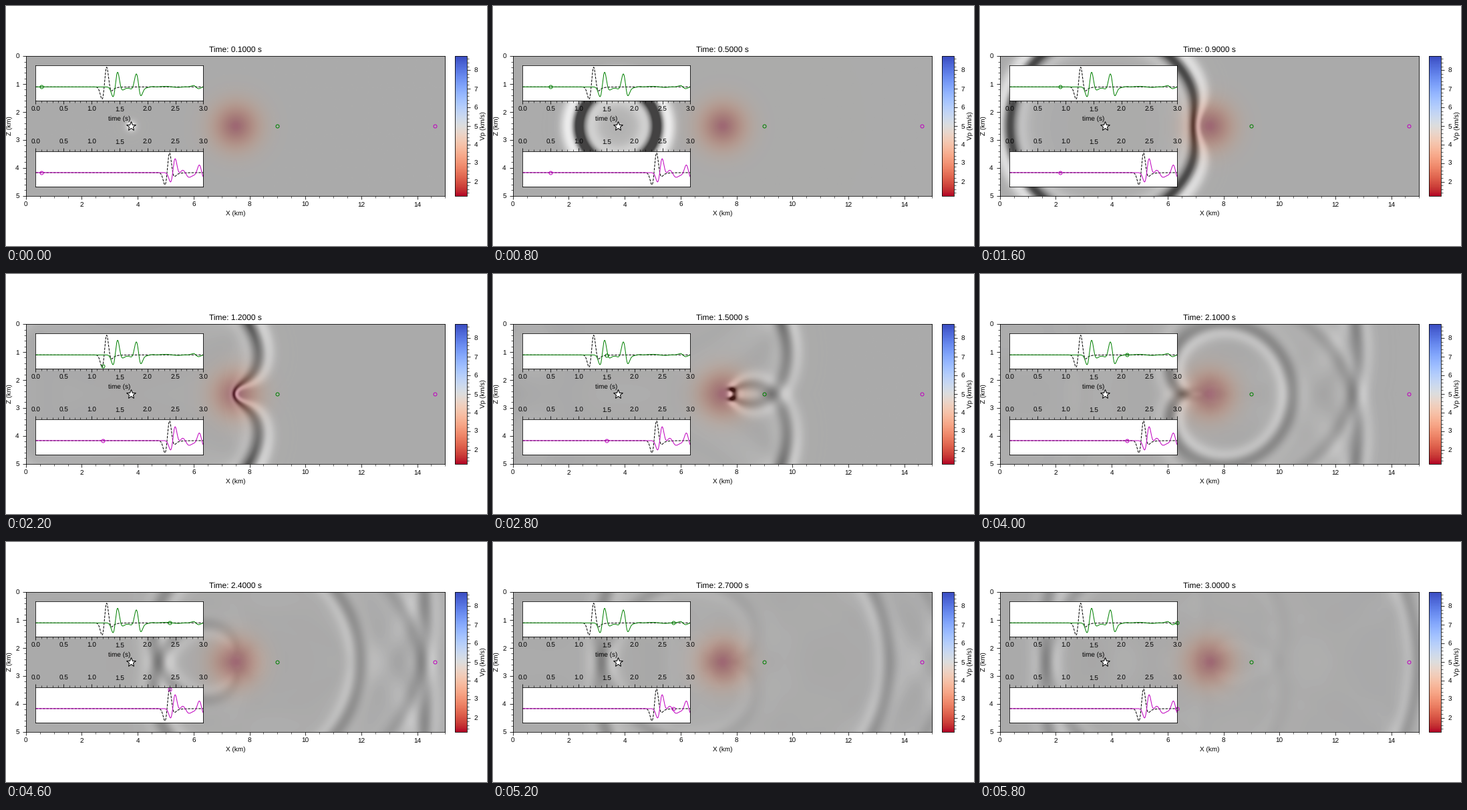
These frames come from a looping animation (720x360 px, 6000 ms). A matplotlib script:

```python
import matplotlib.pyplot as plt
import numpy as np
from matplotlib.animation import FuncAnimation

W, H = 720, 360
LX, LZ, T = 15.0, 5.0, 3.0
DX, DT, PAD = 0.025, 0.0025, 60
C0, FREQ, DELAY = 5.0, 5.0, 0.2
SIGMA = 0.6
FRAMES = 30
STEPS = round(T / DT)
EVERY = STEPS // FRAMES
SRC, REC1, REC2 = 3.75, 9.0, 14.625
MID = LZ / 2

plt.rcParams.update({
    "font.family": "Liberation Sans", "font.size": 10, "axes.titlesize": 12,
    "text.hinting": "none",
    "xtick.major.size": 5, "ytick.major.size": 5,
    "xtick.minor.size": 3, "ytick.minor.size": 3,
    "xtick.major.pad": 4, "ytick.major.pad": 5,
    "xtick.minor.visible": True, "ytick.minor.visible": True,
})


def ricker(t):
    a = (np.pi * FREQ * (t - DELAY)) ** 2
    return (1 - 2 * a) * np.exp(-a)


def direct(t, r):
    """Line-source response at distance r in the uniform medium."""
    step = 3 / 700
    th = (np.arange(700) + 0.5) * step
    s = ricker(t[:, None] - r / C0 * np.cosh(th))
    return s.sum(axis=1) * step / (2 * np.pi)


def velocity(x, z):
    r2 = (x - LX / 2) ** 2 + (z - MID) ** 2
    return C0 - 0.75 * C0 * np.exp(-r2 / (2 * SIGMA ** 2))


def node(x, z=MID):
    return round(z / DX) + PAD, round(x / DX) + PAD


def simulate():
    """Fourth-order acoustic solver with sponge borders."""
    nx, nz = round(LX / DX) + 1, round(LZ / DX) + 1
    x = np.arange(-PAD, nx + PAD) * DX
    z = np.arange(-PAD, nz + PAD)[:, None] * DX
    c = velocity(x, z)
    width = PAD * DX
    ox = np.maximum(np.maximum(-x, x - LX), 0) / width
    oz = np.maximum(np.maximum(-z, z - LZ), 0) / width
    g = 40 * DT / 2 * (ox ** 2 + oz ** 2)
    f32 = np.float32
    k = (c * DT / DX) ** 2
    keep, back = (2 / (1 + g)).astype(f32), (-(1 - g) / (1 + g)).astype(f32)
    gain = (k / (1 + g)).astype(f32)[2:-2, 2:-2]
    src, recs = node(SRC), [node(REC1), node(REC2)]
    push = float(k[src])

    prev, p = np.zeros(c.shape, f32), np.zeros(c.shape, f32)
    traces = np.zeros((2, STEPS + 1))
    shots = []
    for n in range(STEPS):
        near = p[1:-3, 2:-2] + p[3:-1, 2:-2]
        near += p[2:-2, 1:-3]
        near += p[2:-2, 3:-1]
        far = p[:-4, 2:-2] + p[4:, 2:-2]
        far += p[2:-2, :-4]
        far += p[2:-2, 4:]
        near *= 4 / 3
        far *= 1 / 12
        near -= far
        near -= 5 * p[2:-2, 2:-2]
        near *= gain
        prev *= back
        prev += keep * p
        prev[2:-2, 2:-2] += near
        prev[src] += push * float(ricker(n * DT))
        prev, p = p, prev
        traces[:, n + 1] = [p[r] for r in recs]
        if (n + 1) % EVERY == 0:
            shots.append(p[PAD:-PAD, PAD:-PAD].copy())
    return c[PAD:-PAD, PAD:-PAD], shots, traces


def box(x, y, w, h):
    return [x / W, y / H, w / W, h / H]


def ring(ax, x, y, color):
    return ax.plot([x], [y], "o", ms=5, mfc="none", mec=color, mew=1,
                   clip_on=False)[0]


def inset(y, ref, trace, color):
    ax = fig.add_axes(box(44.4, y, 251, 52.7))
    ax.plot(times, ref, "k--", lw=1)
    ax.plot(times, trace, color=color, lw=1)
    lo, hi = ref.min(), ref.max()
    m = 0.05 * (hi - lo)
    ax.set(xlim=(0, T), ylim=(lo - m, hi + m), xticks=np.arange(0, 3.1, 0.5))
    ax.yaxis.set_visible(False)
    return ax, ring(ax, 0, 0, color)


times = np.arange(STEPS + 1) * DT
vel, shots, traces = simulate()
refs = [direct(times, r - SRC) for r in (REC1, REC2)]
peak = direct(times, 3.0).max()

fig = plt.figure(figsize=(W / 72, H / 72), dpi=72, facecolor="white")
ax = fig.add_axes(box(29.8, 75.4, 627.6, 209.4))
look = dict(extent=(0, LX, LZ, 0), aspect="auto", interpolation="bilinear")
vel_im = ax.imshow(vel, cmap="coolwarm_r", vmin=1.25, vmax=8.75, **look)
wave = ax.imshow(shots[0], cmap="Greys", vmin=-peak, vmax=peak, alpha=0.7, **look)
ax.plot([SRC], [MID], "*", ms=15, mfc="white", mec="black", mew=1)
ring(ax, REC1, MID, "g")
ring(ax, REC2, MID, "m")
ax.set(xlim=(0, LX), ylim=(LZ, 0), xlabel="X (km)", ylabel="Z (km)",
       xticks=range(0, 15, 2), yticks=range(6))
title = ax.set_title("")

cax = fig.add_axes(box(672.4, 75.4, 18, 209.4))
bar = fig.colorbar(vel_im, cax=cax, label="Vp (km/s)", ticks=range(2, 9))
bar.minorticks_on()

top, dot1 = inset(217.9, refs[0], traces[0], "g")
top.set_xlabel("time (s)")
low, dot2 = inset(89.3, refs[1], traces[1], "m")
low.xaxis.tick_top()


def update(i):
    n = (i + 1) * EVERY
    t = n * DT
    wave.set_data(shots[i])
    title.set_text(f"Time: {t:.4f} s")
    for dot, ref in zip((dot1, dot2), refs):
        dot.set_data([t], [ref[n]])
    return wave, title, dot1, dot2


anim = FuncAnimation(fig, update, frames=FRAMES, interval=200, repeat=True,
                     repeat_delay=0, blit=False)
plt.show()
```
